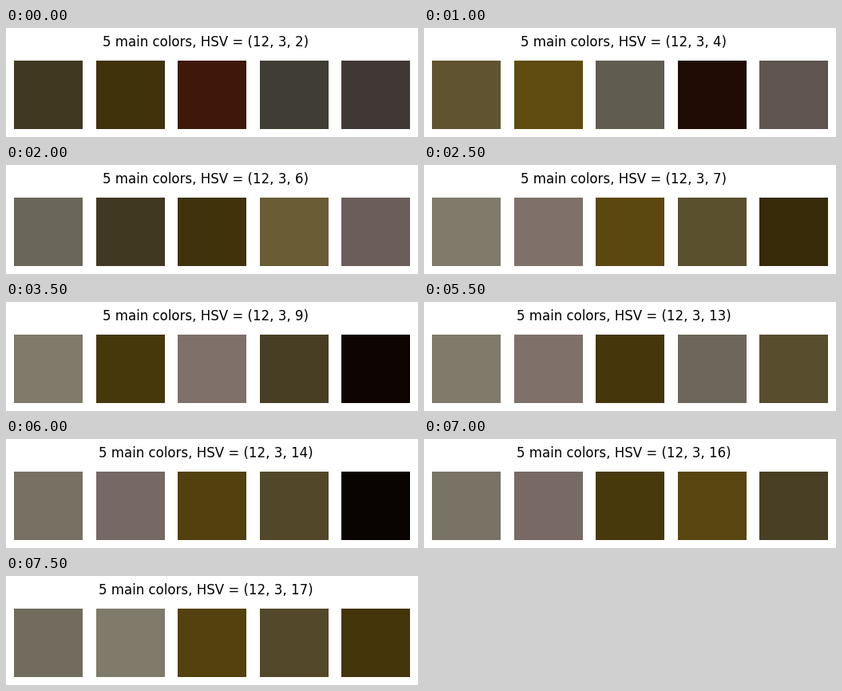
Animation, 516 px wide and 137 px high, one loop 8 s. Source, as a matplotlib script:

```python
import colorsys

import matplotlib.pyplot as plt
from matplotlib.animation import FuncAnimation
from matplotlib.patches import Rectangle

W, H, DPI = 516, 137, 100
SIDE, TOP, LEFT = 86, 41, 10
PITCH = 102.62
HUES, SATS, FIRST = 12, 3, 2

# Hue bin and saturation bin of each tone.
TONES = {"w": (1, 0), "r": (0, 0), "o": (1, 1), "b": (1, 2), "d": (0, 2)}

# Most common colors per number of value bins: tone letter and value bin.
RANKS = [
    "o0 b0 d0 w0 r0",
    "w1 o0 b0 r1 d0",
    "o1 b1 w1 d0 r1",
    "w2 b1 o1 r2 d0",
    "w2 o1 b1 o2 r2",
    "w3 r3 b2 o2 b1",
    "w3 b2 o2 r3 d0",
    "w4 b2 r4 o2 d0",
    "w4 r4 b3 o3 b2",
    "w5 b3 r5 o3 d0",
    "w5 b3 r5 o3 d0",
    "w6 r6 b3 w5 o4",
    "w6 r6 b4 o4 d0",
    "w6 r6 b4 o4 w7",
    "w7 r7 b4 b5 o4",
    "w7 w8 b5 o5 b4",
]


def bin_color(code, values):
    """Color at the center of an HSV bin."""
    hue, sat = TONES[code[0]]
    val = int(code[1:])
    return colorsys.hsv_to_rgb((hue + 0.5) / HUES, (sat + 0.5) / SATS,
                               (val + 0.5) / values)


fig = plt.figure(figsize=(W / DPI, H / DPI), dpi=DPI, facecolor="white")
ax = fig.add_axes([0, 0, 1, 1])
ax.set_xlim(0, W)
ax.set_ylim(H, 0)
ax.axis("off")

swatches = [
    ax.add_patch(Rectangle((round(LEFT + PITCH * i), TOP), SIDE, SIDE,
                           linewidth=0, antialiased=False))
    for i in range(5)
]
title = ax.text(250, 23, "", ha="center", va="baseline", fontsize=12,
                family="DejaVu Sans", color="black")


def update(frame):
    values = FIRST + frame
    for swatch, code in zip(swatches, RANKS[frame].split()):
        swatch.set_facecolor(bin_color(code, values))
    title.set_text(f"5 main colors, HSV = ({HUES}, {SATS}, {values})")
    return [*swatches, title]


anim = FuncAnimation(fig, update, frames=len(RANKS), interval=500,
                     repeat=True, repeat_delay=0)
plt.show()
```
